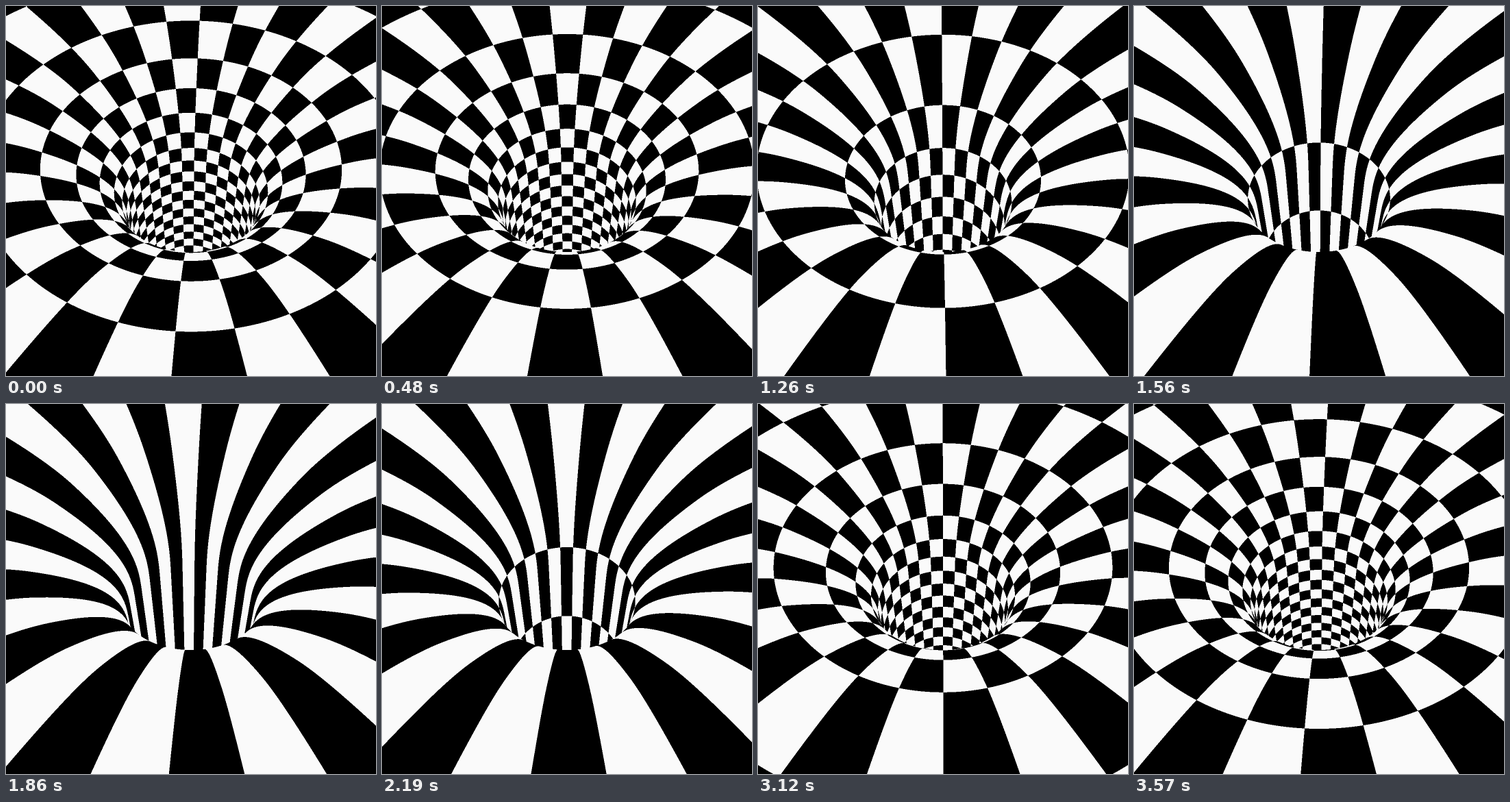
Animation of 540x540 px, one loop 3.6 s. Source, as an HTML page with a canvas:

```html
<!DOCTYPE html>
<html lang="en">
<head>
<meta charset="utf-8">
<title>Checkered funnel</title>
<style>
  html, body { margin: 0; height: 100%; overflow: hidden; background: #000; }
  canvas { display: block; }
</style>
</head>
<body>
<canvas id="stage" width="540" height="540"></canvas>
<script>
const SIZE = 540, SUB = 2, SAMPLES = SUB * SUB;
const LOOP = 3600, STEP = 30;
const SECTORS = 30, RIM = 0.2655, WHITE = 250;

// Camera one unit away from the funnel axis, pitched down
const FOCAL = 652, COS = 0.62, SIN = 0.785;

// Funnel profile: radius and height along the wall parameter t
const radius = t =>
  0.1505 + Math.max(0, 2.09 * (t + 0.109)) ** 3 + 15 * Math.max(0, t - 0.153) ** 2;
const height = t => t - 3 * Math.max(0, t - 0.165) ** 2;

const profile = [];
for (let t = 0.275; t > -0.62; t -= 0.005) {
  profile.push({ t, r: radius(t), drop: SIN - height(t) });
}

// Surface coordinates seen by every sample: sector number and distance from the rim
const sector = new Float32Array(SIZE * SIZE * SAMPLES);
const depth = new Float32Array(sector.length);

function trace(i, x, y) {
  const down = FOCAL * SIN + y * COS;
  const side = x / down, ahead = (FOCAL * COS - y * SIN) / down;
  let gap = 0, t = profile[0].t, drop = profile[0].drop;
  for (const p of profile) {
    const px = side * p.drop, pz = ahead * p.drop - COS;
    const next = Math.sqrt(px * px + pz * pz) - p.r;
    if (next >= 0) {
      const mix = gap < 0 ? gap / (gap - next) : 1;
      t += (p.t - t) * mix;
      drop += (p.drop - drop) * mix;
      break;
    }
    gap = next;
    t = p.t;
    drop = p.drop;
  }
  sector[i] = Math.atan2(side * drop, ahead * drop - COS) / (2 * Math.PI) * SECTORS;
  depth[i] = Math.max(0, RIM - t);
}

let index = 0;
for (let y = 0; y < SIZE; y++) {
  for (let x = 0; x < SIZE; x++) {
    for (let s = 0; s < SAMPLES; s++) {
      const dx = (s % SUB + 0.5) / SUB, dy = (Math.floor(s / SUB) + 0.5) / SUB;
      trace(index++, x + dx - SIZE / 2, y + dy - SIZE / 2);
    }
  }
}

const ctx = document.getElementById('stage').getContext('2d');
const image = ctx.createImageData(SIZE, SIZE);
const pixels = new Uint32Array(image.data.buffer);
const shades = Array.from({ length: SAMPLES + 1 }, (_, lit) =>
  (0xff000000 | Math.round(WHITE * lit / SAMPLES) * 0x010101) >>> 0);

// Rings per unit of wall: dense at the start, almost none halfway through
function ringDensity(time) {
  const a = 2 * Math.PI * (time - 92) / LOOP;
  return Math.max(0.1, 13.3 + 10.95 * Math.cos(a) + 0.05 * Math.sin(a)
    - 1.19 * Math.cos(2 * a) + 1.22 * Math.cos(3 * a) - 0.25 * Math.sin(3 * a));
}

function draw(time) {
  const turn = 0.26 + 2 * time / LOOP;
  const density = ringDensity(time);
  for (let p = 0, i = 0; p < pixels.length; p++) {
    let lit = SAMPLES;
    for (let s = 0; s < SAMPLES; s++, i++) {
      lit -= (Math.floor(sector[i] - turn) + Math.floor(depth[i] * density)) & 1;
    }
    pixels[p] = shades[lit];
  }
  ctx.putImageData(image, 0, 0);
}

let shown = -1;
function tick() {
  const time = Math.floor(performance.now() % LOOP / STEP) * STEP;
  if (time !== shown) draw(shown = time);
  requestAnimationFrame(tick);
}
tick();
</script>
</body>
</html>
```
